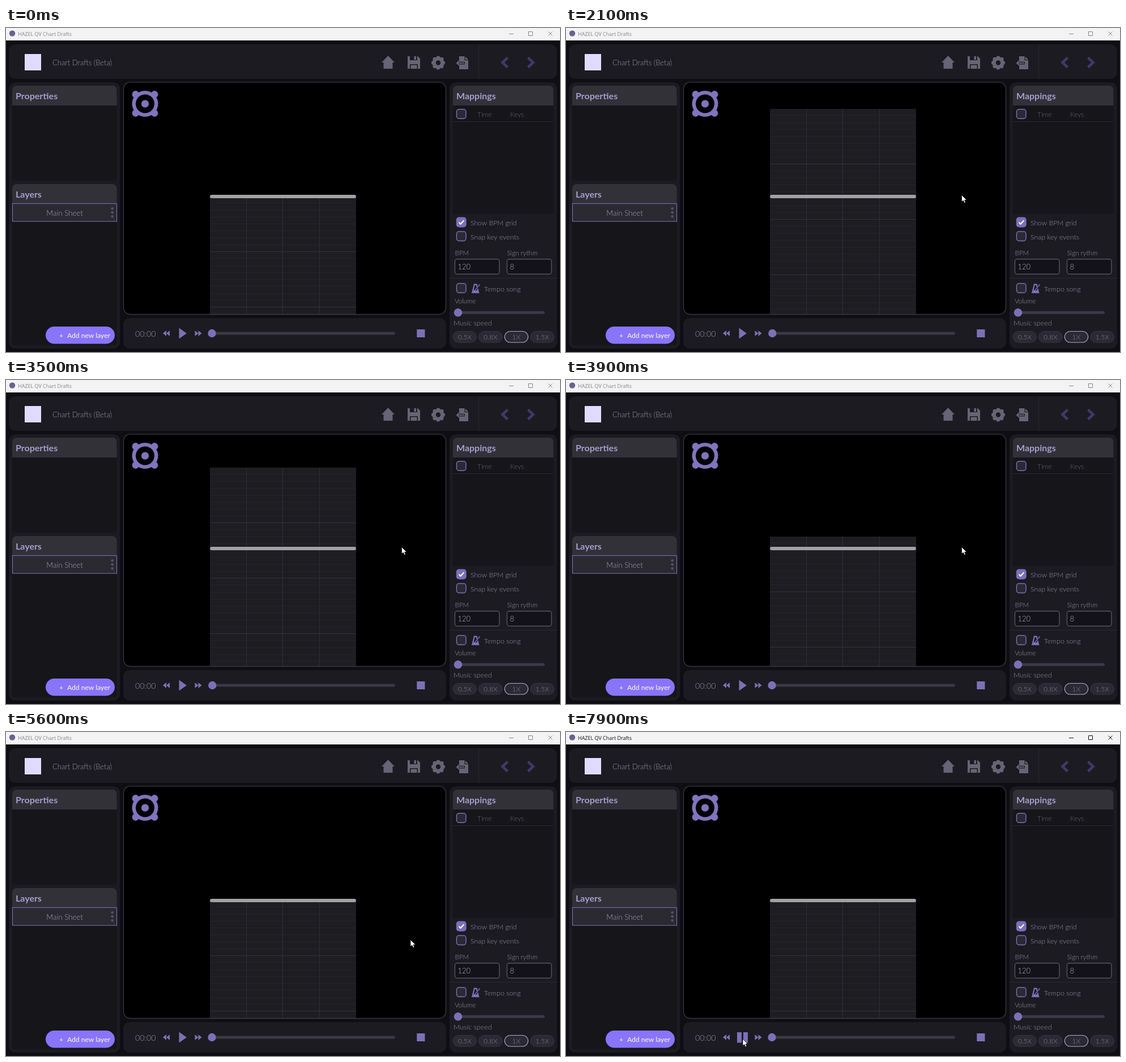
Animation of 978 by 573 pixels, one loop 8 s. Source, as an HTML page with a canvas:

```html
<!DOCTYPE html>
<html lang="en">
<head>
<meta charset="utf-8">
<title>Chart Drafts</title>
<style>
html, body { margin: 0; width: 100%; height: 100%; overflow: hidden; background: #0f0e14; }
canvas { display: block; }
</style>
</head>
<body>
<canvas id="stage" width="978" height="573"></canvas>
<script>
const ctx = document.getElementById('stage').getContext('2d');
const LOOP = 8000, STEP = 100;
const C = {
  back: '#0f0e14', panel: '#1c1b21', head: '#323138', well: '#16151a',
  accent: '#7d70b8', text: '#9791ae', dim: '#686475', title: '#a49dcb',
  icon: '#686376', track: '#3b3848', line: '#2a2931', edge: '#57535f',
  fill: '#2b2933', arrow: '#403a68'
};

// ---------- helpers ----------
function rect(x, y, w, h, fill) {
  ctx.fillStyle = fill;
  ctx.fillRect(x, y, w, h);
}
function box(x, y, w, h, r, fill, stroke, lw = 1.4) {
  ctx.beginPath();
  ctx.roundRect(x, y, w, h, r);
  if (fill) { ctx.fillStyle = fill; ctx.fill(); }
  if (stroke) { ctx.strokeStyle = stroke; ctx.lineWidth = lw; ctx.stroke(); }
}
function dot(x, y, r, fill) {
  ctx.beginPath();
  ctx.arc(x, y, r, 0, Math.PI * 2);
  ctx.fillStyle = fill;
  ctx.fill();
}
function shape(d, x, y, fill, stroke, lw = 1) {
  const p = new Path2D(d);
  ctx.save();
  ctx.translate(x, y);
  if (fill) { ctx.fillStyle = fill; ctx.fill(p); }
  if (stroke) { ctx.strokeStyle = stroke; ctx.lineWidth = lw; ctx.stroke(p); }
  ctx.restore();
}
function text(str, x, y, size, color = C.text, weight = 300, align = 'left', family = 'Lato') {
  ctx.font = `${weight} ${size}px ${family}, sans-serif`;
  ctx.textAlign = align;
  ctx.fillStyle = color;
  ctx.fillText(str, x, y);
}
function section(label, x, y, w, h) {
  box(x, y, w, 35, [8, 8, 0, 0], C.head);
  rect(x, y + 35, w, h, C.well);
  text(label, x + 6, y + 23.5, 16, C.title, 700);
}
function checkbox(y, on) {
  box(795.5, y, 16.5, 16.5, 4, on ? C.accent : C.fill, C.accent);
  if (on) shape('M4 8.5l3 3 5.7-6.3', 795.5, y, null, '#fff', 2);
}
function slider(x0, x1, y, knob) {
  box(x0, y - 2.5, x1 - x0, 5, 2.5, C.track);
  dot(knob, y, 7.2, C.accent);
}

// ---------- motion ----------
function easeOut(t, t0, t1, power) {
  const p = Math.min(1, Math.max(0, (t - t0) / (t1 - t0)));
  return 1 - (1 - p) ** power;
}

const scrollAt = t => 313 * (easeOut(t, 1992, 2992, 6) - easeOut(t, 3190, 4145, 2));

// Each stroke of the hand: when it runs, where it ends, how far it bows sideways.
const strokes = [
  { from: 300, to: 700, x: 457, y: 292 },
  { from: 700, to: 1200, x: 316, y: 306 },
  { from: 1200, to: 1300, x: 386, y: 298 },
  { from: 1400, to: 1600, x: 698.5, y: 295.5 },
  { from: 4000, to: 4200, x: 683, y: 263, bow: 15 },
  { from: 4300, to: 5200, x: 645, y: 340, bow: 40 },
  { from: 5200, to: 5600, x: 714, y: 367.5 },
  { from: 6000, to: 6600, x: 703, y: 363 },
  { from: 6700, to: 7600, x: 312, y: 543 }
];
function cursorAt(t) {
  let x = 255, y = 103;
  for (const s of strokes) {
    if (t < s.from) break;
    const f = easeOut(t, s.from, s.to, 2);
    const dx = s.x - x, dy = s.y - y;
    const side = (s.bow || 0) * Math.sin(Math.PI * f) / Math.hypot(dx, dy);
    x += dx * f - dy * side;
    y += dy * f + dx * side;
  }
  return [x, y];
}

// ---------- parts ----------
function titleBar(active) {
  const ink = active ? '#111' : '#858585';
  rect(0, 0, 978, 22, '#f3f3f3');
  dot(11, 9.5, 5.2, '#6c6294');
  text('HAZEL QV Chart Drafts', 21, 14, 9, ink, 400, 'left', '"Open Sans"');
  shape('M0 4h8M34.5 0h7v7h-7zM69.5 0l7 7m0-7l-7 7', 888, 6.5, null, ink);
}

function header() {
  box(5, 29, 968, 61, 12, C.panel);
  rect(834, 29, 1, 61, C.line);
  rect(33, 46, 29, 29, '#e2dbff');
  text('Chart Drafts (Beta)', 82, 66, 13);

  // home
  shape('M11.5 0L23 12h-3.5v11h-16V12H0z', 663, 49, C.icon);
  // save
  shape('M0 0h18l4 4v18H0z', 709, 50, C.icon);
  rect(713, 50, 13, 7, C.panel);
  rect(720.5, 50, 3.5, 6, C.icon);
  rect(713, 64, 14, 8, C.panel);
  rect(714.5, 65.5, 11, 6.5, C.icon);
  // settings
  for (let i = 0; i < 8; i++) {
    const a = i * Math.PI / 4;
    dot(763 + 8.4 * Math.cos(a), 61.5 + 8.4 * Math.sin(a), 3.7, C.icon);
  }
  dot(763, 61.5, 9.5, C.icon);
  dot(763, 61.5, 4.2, C.panel);
  // export
  shape('M0 0h10l6 6v17H0z', 800, 50, C.icon);
  shape('M10 0v6.5h6', 800, 50, null, C.panel, 1.2);
  shape('M-5 12h15', 800, 50, null, C.panel, 4.5);
  shape('M9 12H-4M0 8l-4 4 4 4', 800, 50, null, C.icon, 2);
  // history
  shape('M9 0L0 8.5 9 17', 876.5, 52.5, null, C.arrow, 4.5);
  shape('M0 0l9 8.5L0 17', 921.5, 52.5, null, C.arrow, 4.5);
}

function leftPanel() {
  box(5, 96, 196, 471, 12, C.panel);
  section('Properties', 11, 102, 184.5, 133);
  section('Layers', 11, 276, 184.5, 250);
  box(11.5, 310.5, 184, 31.5, 0, '#2b2932', C.accent, 1.1);
  text('Main Sheet', 103.5, 332, 13.2, '#a6a0bf', 300, 'center');
  for (let i = 0; i < 3; i++) dot(187.7, 319.3 + i * 7, 2.2, '#56525f');
  box(70, 528, 122, 30.5, 15.2, '#8875fb');
  text('+', 94, 548, 12, '#fff', 400);
  text('Add new layer', 108, 548, 12.1, '#fff', 400);
}

function rightPanel() {
  box(783, 96, 190, 471, 12, C.panel);
  section('Mappings', 789, 102, 177.5, 191.5);
  checkbox(143.8);
  text('Time', 832, 156.5, 12, C.dim);
  text('Keys', 890, 156.5, 12, C.dim);
  rect(789, 165, 177.5, 1, C.line);

  checkbox(335.3, true);
  text('Show BPM grid', 820, 348.5, 12.2);
  checkbox(360);
  text('Snap key events', 820, 374, 12.4);
  [['BPM', '120'], ['Sign rythm', '8']].forEach(([label, value], i) => {
    const x = 792.5 + i * 92;
    text(label, x, 401.5, 11.6);
    box(x, 408.8, 78.5, 26.5, 4, '#131218', C.edge);
    text(value, x + 5, 427, 13, '#b0a9d0');
  });
  rect(783, 442, 190, 1, C.line);

  checkbox(451.8);
  shape('M4 0h5.5l4 16.5H0z', 822, 452.5, C.accent);
  shape('M5.5 2.5H8l2 8.5H3.6z', 822, 452.5, C.panel);
  shape('M6.5 11L15 1', 822, 452.5, null, C.panel, 3);
  shape('M6.5 10.5l8-9.5', 822, 452.5, null, C.accent, 1.5);
  text('Tempo song', 844, 465.8, 12.4);

  text('Volume', 792, 487, 11.5);
  slider(798, 951, 503.3, 798);
  text('Music speed', 790, 525.5, 12.5);
  ['0.5X', '0.8X', '1X', '1.5X'].forEach((label, i) => {
    const on = label === '1X', x = 789 + i * 45.6;
    box(x, 536.5, 41.5, 19.5, 9.7, C.fill, on ? '#b3a9de' : '#393644', on ? 1.2 : 1);
    text(label, x + 20.8, 550.5, 12, '#878298', 300, 'center');
  });
}

function viewport(scroll) {
  const left = 360, width = 258, bar = 298, beat = 98, lanes = 4, bottom = 507;
  const top = Math.round(bar - scroll);
  const frame = [207.5, 95.8, 569, 410.7, 12];
  box(...frame, '#000');
  ctx.save();
  ctx.clip();
  rect(left, top, width, bottom - top, '#1e1d22');
  for (let k = 1; top + k * beat / 8 < bottom; k++) {
    rect(left, Math.round(top + k * beat / 8 - 1), width, 1, k % 8 ? '#25242a' : '#34333a');
  }
  for (let i = 1; i < lanes; i++) {
    rect(Math.round(left + i * width / lanes - 0.6), top, 1, bottom - top, '#302f36');
  }
  box(left, bar - 3, width, 6, 3, '#a2a1a4');
  ctx.restore();
  box(...frame, null, '#3a3941', 1.3);

  // focus button
  const cx = 245.5, cy = 134, hue = '#8075bd';
  for (const i of [-1, 1]) {
    for (const j of [-1, 1]) dot(cx + i * 16.7, cy + j * 16.7, 6.2, hue);
  }
  dot(cx, cy, 23, hue);
  dot(cx, cy, 16.5, '#000');
  dot(cx, cy, 6.6, hue);
}

function transport(scroll, playing) {
  box(207, 513, 570, 54, 12, C.panel);
  text('00:0' + Math.floor(scroll / 196), 228, 546, 14.3);
  for (const x of [277, 283]) shape('M0 5l6-5v10z', x, 535, C.accent);
  for (const x of [333.5, 339.5]) shape('M6 5L0 0v10z', x, 535, C.accent);
  if (playing) {
    for (const x of [302, 313]) rect(x, 531, 8, 18.5, C.accent);
  } else {
    shape('M0 0l13.5 9.5L0 19z', 305.5, 530.5, C.accent);
  }
  slider(363, 687, 540, 363.5 + scroll * 0.0052);
  rect(725.3, 533, 14.2, 14, C.accent);
}

function draw(t) {
  const scroll = scrollAt(t);
  rect(0, 0, 978, 573, C.back);
  titleBar(t >= 7800);
  header();
  leftPanel();
  rightPanel();
  viewport(scroll);
  transport(scroll, t >= 7900);
  if (t >= strokes[0].from) {
    shape('M0 0v12l2.8-2.5 2 4.3 2.1-.9L5 8.8l3.8-.2z', ...cursorAt(t), '#fff', '#000', 0.7);
  }
}

// The screen refreshes in 100 ms steps.
const start = performance.now();
function tick() {
  const t = (performance.now() - start) % LOOP;
  draw(Math.floor(t / STEP) * STEP);
  requestAnimationFrame(tick);
}
tick();
</script>
</body>
</html>
```
